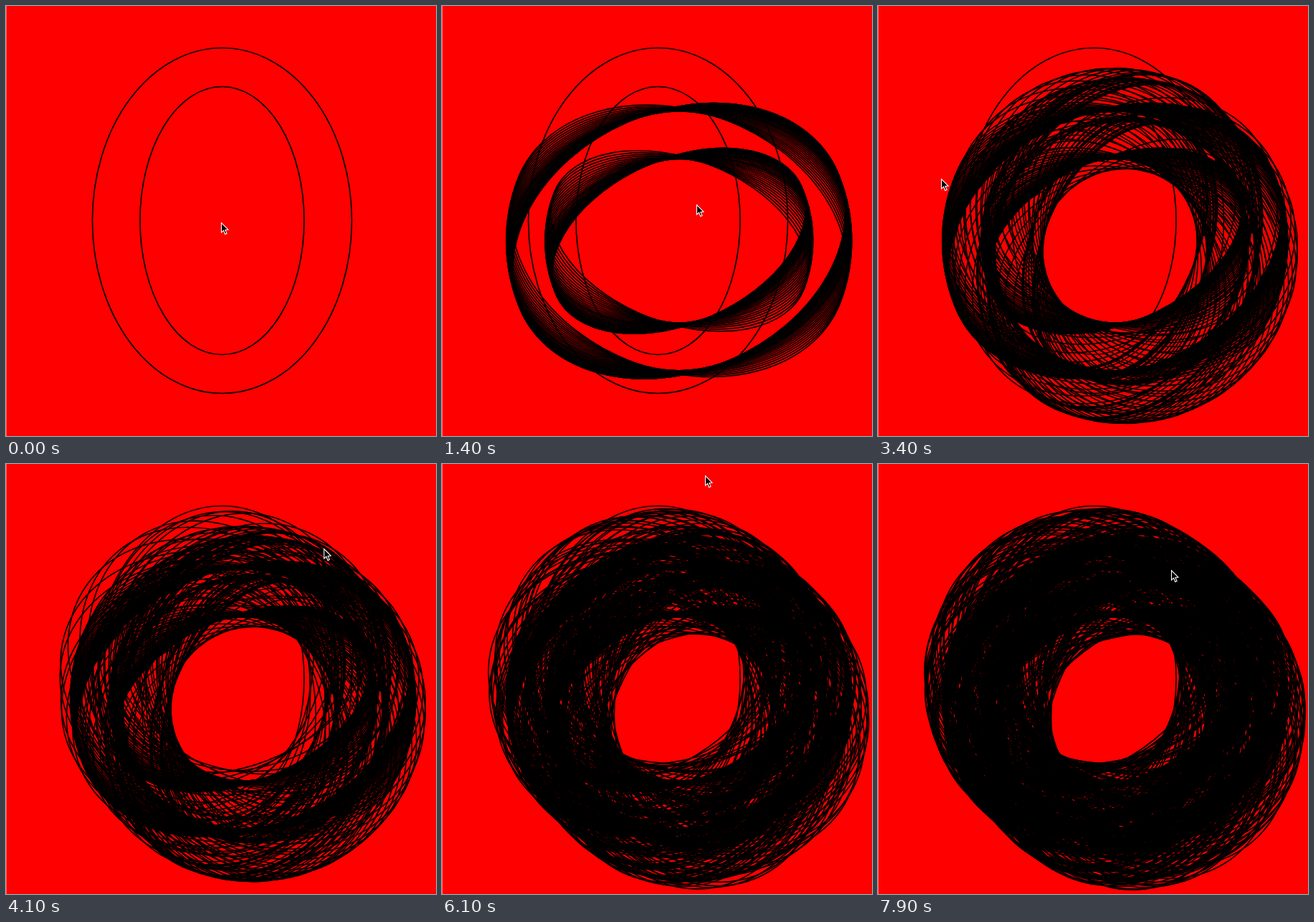
Write an HTML page with a canvas that moves like this. It is 600 by 600 pixels and loops after 8 s.

```html
<!DOCTYPE html>
<html lang="en">
<head>
<meta charset="utf-8">
<title>Turning rings</title>
<style>
  html, body { margin: 0; width: 100%; height: 100%; overflow: hidden; background: #f00; }
  canvas { display: block; width: 600px; height: 600px; }
</style>
</head>
<body>
<canvas id="stage" width="600" height="600"></canvas>
<script>
const ctx = document.getElementById('stage').getContext('2d');
const LOOP = 8000, STEP = 100, PER_STEP = 3;
const SETTLED = 2.401, LOOSE = 3.601;   // seconds at which the motion changes
const GOLDEN = 180 * 0.618034;          // spreads loose rotations evenly
const LEAN = [1, -1, 1, -1, -1, 1];     // side of the diagonal, per phase

// [seconds, x, y]
const pointer = [
  [0, 300, 302], [0.4, 330, 122], [1.4, 355, 277], [2.4, 466, 331],
  [3.4, 88, 241], [3.9, 250, 54], [4.2, 540, 150], [4.9, 95, 420],
  [5.7, 560, 200], [6.1, 367, 16], [7, 490, 90], [7.9, 409, 148]
];

const mix = (a, b, k) => a + (b - a) * k;
const progress = (t, from, to) => Math.min(1, Math.max(0, (t - from) / (to - from)));
const swing = k => (1 - Math.cos(Math.PI * k)) / 2;

function noise(n) {
  const v = Math.sin(n * 127.1 + 11.7) * 43758.5453;
  return v - Math.floor(v);
}

function pointerAt(t) {
  const i = Math.max(1, pointer.findIndex(p => p[0] >= t));
  const a = pointer[i - 1], b = pointer[i];
  const k = progress(t, a[0], b[0]);
  return [mix(a[1], b[1], k), mix(a[2], b[2], k)];
}

// Slow turn, swing back past the start, rest, full sweep, then scattered.
function rotation(t, i) {
  if (t < 1.25) return mix(66, 114, (1 - t / 1.25) ** 2.5);
  if (t < SETTLED) return mix(66, 204, swing(progress(t, 1.25, 1.95)));
  if (t < LOOSE) return 204 - 230 * progress(t, SETTLED, LOOSE) ** 2;
  return i * GOLDEN;
}

// Each phase halves the distance left to the end of the diagonal.
function shift(t, i) {
  if (t < SETTLED) return 0;
  const phase = Math.max(0, Math.floor((t - 0.001) / 0.9) - 3);
  const reach = Math.min(0.92, 1 - 0.5 ** (phase + 1));
  const spread = t < LOOSE ? 0.08 : 0.4;
  return 28 * LEAN[phase] * reach * (1 - spread * noise(i) ** 2);
}

function ring(x, y, degrees) {
  const angle = degrees * Math.PI / 180;
  for (const [rx, ry] of [[181, 241], [114.5, 187]]) {
    ctx.beginPath();
    ctx.ellipse(x, y, rx, ry, angle, 0, Math.PI * 2);
    ctx.stroke();
  }
}

function arrow(x, y) {
  ctx.save();
  ctx.translate(x, y);
  ctx.beginPath();
  [[0.5, 0.5], [0.5, 14], [3.6, 11.2], [5.8, 16.4], [8, 15.4], [5.9, 10.4], [10, 10]]
    .forEach(p => ctx.lineTo(...p));
  ctx.closePath();
  ctx.fillStyle = '#000';
  ctx.fill();
  ctx.strokeStyle = '#fff';
  ctx.lineWidth = 1.1;
  ctx.stroke();
  ctx.restore();
}

function draw(step) {
  ctx.fillStyle = '#f00';
  ctx.fillRect(0, 0, 600, 600);
  ctx.fillStyle = '#ff6060';
  ctx.fillRect(0, 0, 1, 600);
  ctx.strokeStyle = '#000';
  ctx.lineWidth = 1.7;
  ring(301.5, 299.5, 0);
  for (let i = 1; i <= step * PER_STEP; i++) {
    const t = i * STEP / PER_STEP / 1000;
    const d = shift(t, i);
    ring(330.7 + d, 327.8 + d, rotation(t, i));
  }
  arrow(...pointerAt(step * STEP / 1000));
}

let shown = -1;
function tick() {
  const step = Math.floor(performance.now() % LOOP / STEP);
  if (step !== shown) draw(shown = step);
  requestAnimationFrame(tick);
}
tick();
</script>
</body>
</html>
```
